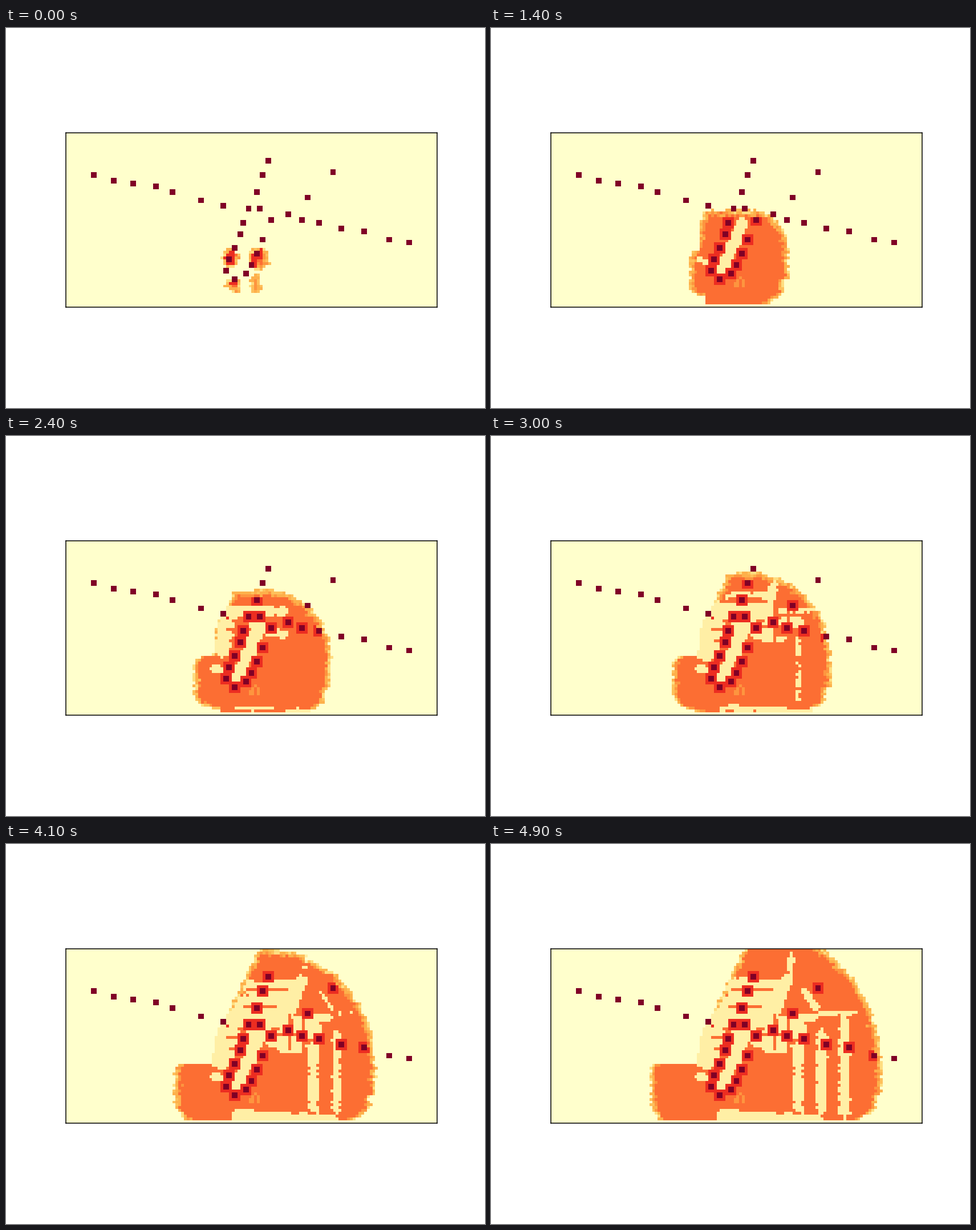
A matplotlib script that plays this animation: 840 by 667 pixels, repeating every 5 s.

```python
import numpy as np
import matplotlib.pyplot as plt
from matplotlib.animation import FuncAnimation

WIDTH, HEIGHT, DPI = 840, 667, 100
COLS, ROWS, FRAMES = 132, 62, 50
LEFT, TOP, CELL = 105, 183.9, 4.932
PALE, BODY, HALO = 0.11, 0.56, 0.70

rng = np.random.default_rng(4)
rough = rng.normal(0, 1, (ROWS, COLS))
streak = (rough + np.roll(rough, 1, 1) + np.roll(rough, 2, 1)) / 1.73
pick = rng.random((ROWS, COLS))

# Cell centres in stage pixels.
y, x = np.mgrid[:ROWS, :COLS] + 0.5
x, y = LEFT + x * CELL, TOP + y * CELL


def ramp(values):
    return np.maximum(values, 0)


def oval(cx, cy, rx, ry):
    """Depth in cells inside an ellipse."""
    return (1 - np.hypot((x - cx) / rx, (y - cy) / ry)) * min(rx, ry) / CELL


def distance(x0, y0, x1, y1):
    """Distance in pixels to a segment."""
    dx, dy = x1 - x0, y1 - y0
    along = np.clip(((x - x0) * dx + (y - y0) * dy) / (dx * dx + dy * dy), 0, 1)
    return np.hypot(x - x0 - along * dx, y - y0 - along * dy)


pillars = [
    (154, 258), (189, 268), (223, 273), (262, 278), (292, 288), (341, 303),
    (381, 313), (425, 317), (445, 317), (460, 233), (450, 258), (440, 288),
    (416, 342), (411, 361), (401, 386), (391, 406), (386, 425), (401, 441),
    (421, 431), (431, 416), (440, 396), (450, 371), (465, 337), (495, 327),
    (520, 337), (549, 342), (589, 352), (628, 357), (672, 371), (707, 377),
    (529, 297), (574, 253)]

pillar_mask = np.zeros((ROWS, COLS), bool)
halo_mask = np.zeros((ROWS, COLS), bool)
for px, py in pillars:
    col, row = round((px - LEFT) / CELL), round((py - TOP) / CELL)
    pillar_mask[row - 1:row + 1, col - 1:col + 1] = True
    halo_mask[row - 2:row + 2, col - 2:col + 2] = True

seeds = np.maximum.reduce([oval(394, 403, 16, 18), oval(443, 406, 18, 20),
                           oval(400, 452, 15, 13), oval(438, 446, 10, 16)])

# Frame at which each front arrives: fast up and right, slow to the left.
up = ramp(390 - y) / 5
right = ramp(x - 457) / 4.65 + np.where((y > 440) & (x > 457), 2, 0)
fast_front = np.hypot(up, right) + ramp(y - 465) / 3
climb = np.where(x < 366, ramp(400 - y) / 0.8, 0) + ramp(y - 455)
slow_front = np.hypot(ramp(376 - x) / 1.95, np.where(x < 376, climb, 0))
slope_depth = (x - 364 - 0.5 * ramp(345 - y)) / CELL
slope_depth[y > 385] = COLS

# Areas left behind: segment, radius, first frame, last frame.
cleared = [
    (441, 345, 405, 422, 13, 3, 16), (434, 330, 485, 350, 13, 18, 28),
    (390, 310, 378, 376, 21, 18, 27), (364, 408, 382, 411, 5, 10, 19),
    (527, 194, 524, 236, 6, 38, 45), (520, 238, 496, 300, 10, 30, 37),
    (495, 265, 483, 330, 8, 24, 30), (508, 308, 565, 304, 7, 24, 34),
    (512, 328, 540, 328, 16, 24, 34), (484, 353, 516, 356, 12, 27, 38),
    (548, 258, 570, 286, 6, 37, 45), (565, 299, 635, 295, 5, 40, 45),
    (405, 477, 575, 484, 10, 18, 40)]
for k in range(3):
    gap = 539 + 40.5 * k
    cleared.append((gap, 355 - 22 * k, gap, 462 + 5 * k, 9, 25 + 8 * k, 39 + 4 * k))
    level = 308 - 28 * k
    cleared.append((405 + 12 * k, level, 485 + 10 * k, level, 16,
                    19 + 7.5 * k, 29 + 7 * k))
cleared = [(distance(*c[:4]), *c[4:]) for c in cleared]

# Thin strands that stay attached to the pillars.
strands = np.logical_or.reduce([distance(*ends) < CELL / 2 for ends in [
    (388, 340, 414, 340), (394, 359, 411, 359), (420, 286, 473, 286),
    (422, 256, 493, 256), (530, 297, 573, 297), (520, 305, 520, 374),
    (497, 300, 497, 360), (452, 350, 452, 371), (470, 335, 515, 335)]])
mottled = (np.abs(x - 435) < 10) & (np.abs(y - 445) < 11) & (pick < 0.6)


def state(frame):
    head_start = ramp(3 - frame)
    depth = np.minimum.reduce([
        frame - fast_front + head_start,
        0.4 * (frame - slow_front) + head_start,
        slope_depth, seeds + frame]) + 0.35 * streak
    depth[-1] = -1

    outer = np.select([pick < 0.3, pick < 0.7], [0.22, 0.33], 0.38)
    inner = np.where(pick < 0.55, 0.38, 0.47)
    seam = np.where(pick < 0.3, 0.47, BODY)
    value = np.select([depth < 0, depth < 0.9, depth < 1.7, depth < 2.4],
                      [0, outer, inner, seam], BODY)
    value[(depth > 2.4) & mottled] = 0.47

    pale = np.zeros((ROWS, COLS), bool)
    for reach, radius, start, end in cleared:
        if frame > start:
            grown = min(1, (frame - start) / (end - start))
            pale |= reach + 1.3 * streak < radius * grown
    value[pale & ~strands & (depth > 0)] = PALE
    value[halo_mask & (depth > min(2, 0.9 + 0.3 * frame))] = HALO
    value[pillar_mask] = 1
    return value


fig, ax = plt.subplots(figsize=(WIDTH / DPI, HEIGHT / DPI), dpi=DPI)
fig.subplots_adjust(left=0.125, right=0.9, bottom=0.11, top=0.88)
image = ax.imshow(state(0), cmap="YlOrRd", vmin=0, vmax=1,
                  interpolation="nearest")
ax.set(xticks=[], yticks=[])
for spine in ax.spines.values():
    spine.set_linewidth(1.1)


def update(frame):
    image.set_data(state(frame))
    return [image]


animation = FuncAnimation(fig, update, frames=FRAMES, interval=100, repeat=True)
plt.show()
```
